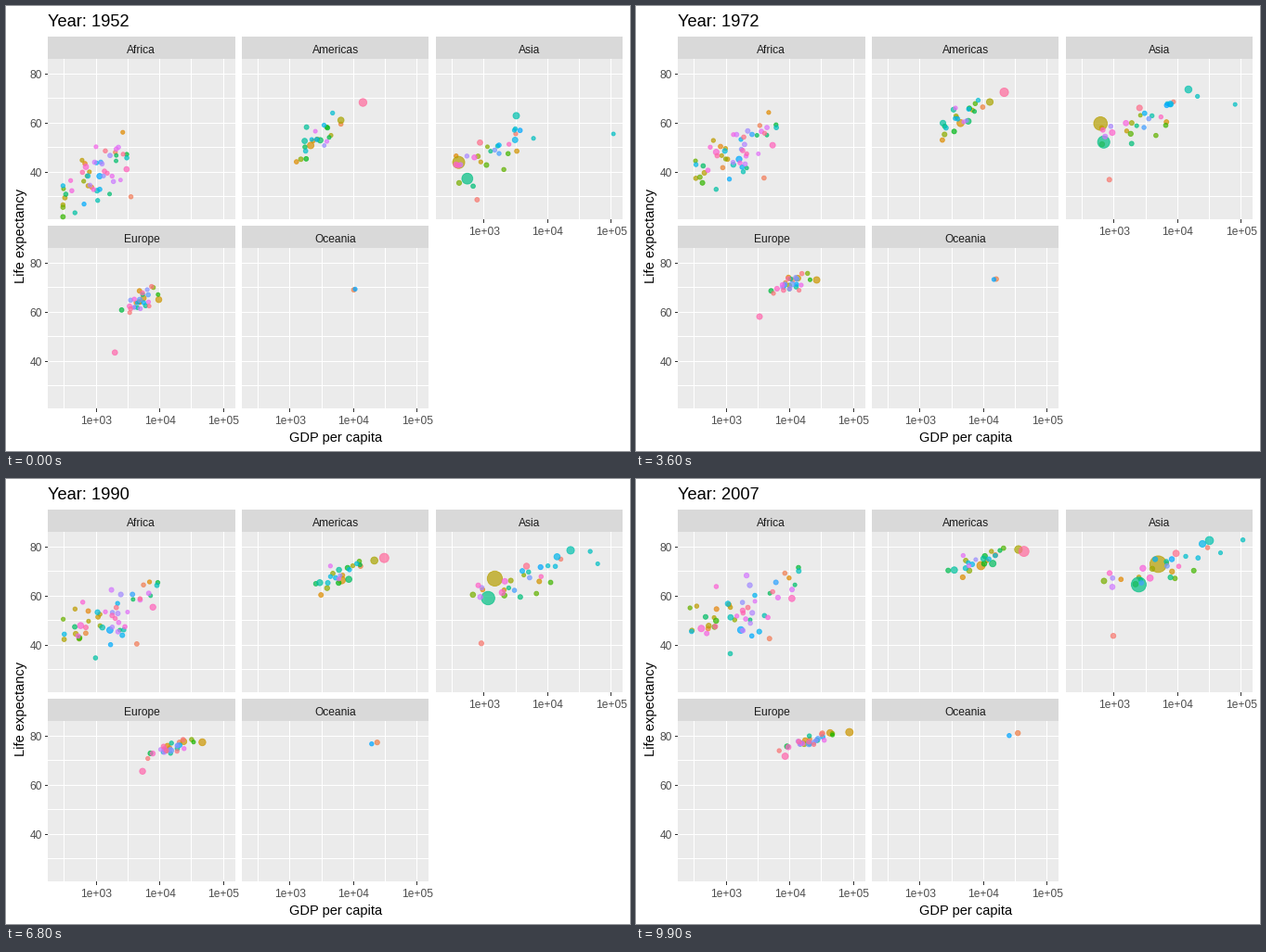
Write a matplotlib script that moves like this. It is 672 px wide and 480 px high and loops after 10000 ms.

```python
import numpy as np
import matplotlib.pyplot as plt
from matplotlib.animation import FuncAnimation
from matplotlib.patches import Rectangle

W, H, DPI = 672, 480, 96
FRAMES, KEYS = 100, 12
PX = 72 / DPI
HUES = 142
plt.rcParams["font.family"] = "Liberation Sans"

# column, row, ease, dots in the cloud, gdp spread, first and last centre
PANELS = {
    "Africa": (0, 0, 0.5, 51, 0.33, (2.98, 39), (3.23, 54.5)),
    "Americas": (1, 0, 0.85, 23, 0.23, (3.45, 53.5), (3.93, 74)),
    "Asia": (2, 0, 0.6, 28, 0.40, (3.17, 48), (3.75, 71.5)),
    "Europe": (0, 1, 0.65, 29, 0.21, (3.72, 65.5), (4.35, 78.5)),
    "Oceania": (1, 1, 1.0, 0, 0, (4, 69), (4.5, 81)),
}

# Dots that stand apart: hue rank, population in millions,
# first and last (gdp, life), and how late gdp grows
STANDOUTS = [
    ("Africa", 4, 7, (3521, 30), (4797, 42.7), 1),
    ("Americas", 15, 115, (2109, 50.9), (9066, 72.4), 0.7),
    ("Americas", 135, 222, (13990, 68.4), (42952, 78.2), 1),
    ("Asia", 1, 14, (779, 28.8), (975, 43.8), 1),
    ("Asia", 25, 880, (400, 44), (4959, 73), 1.75),
    ("Asia", 59, 650, (547, 37.4), (2452, 64.7), 1.85),
    ("Asia", 67, 110, (3217, 63), (31656, 82.6), 0.4),
    ("Asia", 72, 1, (108382, 55.6), (47307, 77.6), 1),
    ("Europe", 132, 43, (1969, 43.6), (8458, 71.8), 1),
    ("Oceania", 6, 14, (10040, 69.1), (34435, 81.2), 1),
    ("Oceania", 92, 3, (10557, 69.4), (25185, 80.2), 1),
]


def panel_left(col):
    return 45.2 + 208.83 * col


def panel_top(row):
    return 57.4 + 204 * row


def x_px(log_gdp, col):
    return panel_left(col) + 51.9 + 68.5 * (log_gdp - 3)


def y_px(life, row):
    return panel_top(row) + 121.9 - 2.65 * (life - 40)


def lerp(a, b, t):
    return a + (b - a) * t


def hcl(hue, chroma=100, lum=65):
    """Polar CIE-Luv colours as clipped sRGB."""
    a = np.radians(hue)
    y = ((lum + 16) / 116) ** 3
    u = chroma * np.cos(a) / (13 * lum) + 0.1978
    v = chroma * np.sin(a) / (13 * lum) + 0.4683
    x = 2.25 * y * u / v
    z = 3 * y / v - x / 3 - 5 * y
    to_rgb = np.array([[3.2405, -1.5371, -0.4985],
                       [-0.9693, 1.8760, 0.0416],
                       [0.0556, -0.2040, 1.0572]])
    lin = np.clip(to_rgb @ np.array([x, np.full_like(x, y), z]), 0, 1)
    rgb = np.where(lin <= 0.0031308, 12.92 * lin,
                   1.055 * lin ** (1 / 2.4) - 0.055)
    return np.clip(rgb, 0, 1).T


def radius(pop):
    return 1.85 + 7.1 * np.sqrt(np.clip(pop / 1318, 0, 1))


def cloud_path(first, last, ease, spread, u, rng):
    """A point drifting with its panel's centre, keeping most of its offset."""
    a, b, c, d = np.clip(rng.normal(size=4), -1.9, 1.9)
    t, hump = u ** ease, 4 * u * (1 - u)
    mean = lerp(first[1], last[1], t)
    dx = spread * (0.8 + 0.4 * u) * lerp(a, 0.8 * a + 0.6 * b, u)
    dy = (0.13 + 0.11 * u) * (84 - mean) * lerp(c, 0.6 * c + 0.8 * d, u)
    x = lerp(first[0], last[0], t) + dx + rng.normal(0, 0.02, KEYS) * hump
    y = mean + lerp(14, 9, t) * dx + dy + rng.normal(0, 0.4, KEYS) * hump
    ceiling = 74 + 9 * u
    return x, ceiling - 1.5 * np.log1p(np.exp((ceiling - y) / 1.5))


def build_dots():
    rng = np.random.default_rng(52)
    u = np.linspace(0, 1, KEYS)
    dots = []

    def add(rank, pop, x, y, panel):
        col, row = PANELS[panel][:2]
        r = radius(pop * np.exp(0.85 * (u - 0.5)))
        dots.append((rank, np.array([x_px(x, col), y_px(y, row), r])))

    for panel, rank, pop, (g0, l0), (g1, l1), late in STANDOUTS:
        x = lerp(np.log10(g0), np.log10(g1), u ** late)
        add(rank, pop, x, lerp(l0, l1, u ** PANELS[panel][2]), panel)

    used = [s[1] for s in STANDOUTS]
    free = iter(rng.permutation(np.setdiff1d(np.arange(1, HUES + 1), used)))
    for panel, (_, _, ease, count, spread, first, last) in PANELS.items():
        for _ in range(count):
            pop = min(6 * np.exp(rng.normal(0, 1.1)), 90)
            add(next(free), pop,
                *cloud_path(first, last, ease, spread, u, rng), panel)

    dots.sort(key=lambda dot: dot[0])
    return np.array([d[0] for d in dots]), np.array([d[1] for d in dots])


fig = plt.figure(figsize=(W / DPI, H / DPI), dpi=DPI, facecolor="white")
ax = fig.add_axes([0, 0, 1, 1])
ax.set(xlim=(0, W), ylim=(H, 0))
ax.axis("off")


def label(x, y, text, size=12, color="#4D4D4D", ha="center", **kw):
    return ax.text(x, y, text, fontsize=size * PX, color=color, ha=ha,
                   va="baseline", **kw)


def box(x0, y0, x1, y1, color):
    x0, y0, x1, y1 = np.round([x0, y0, x1, y1])
    ax.add_patch(Rectangle((x0, y0), x1 - x0, y1 - y0, fc=color, ec="none",
                           snap=False))


def h_line(x0, x1, y, color="white"):
    box(x0, np.floor(y), x1, np.floor(y) + 1, color)


def v_line(x, y0, y1, color="white"):
    box(np.floor(x), y0, np.floor(x) + 1, y1, color)


def draw_panel(name, col, row):
    left, top = panel_left(col), panel_top(row)
    right, bottom = left + 201.4, top + 172.6
    box(left, top - 24.4, right, top, "#D9D9D9")
    box(left, top, right, bottom, "#EBEBEB")
    label((left + right) / 2, top - 6, name, color="#1A1A1A")
    for e in np.arange(2.5, 5.1, 0.5):
        v_line(x_px(e, col), top, bottom)
    for life in range(30, 81, 10):
        h_line(left, right, y_px(life, row))
    if row == 1 or col == 2:
        for e in (3, 4, 5):
            x = x_px(e, col)
            v_line(x, bottom, bottom + 3.7, "#333333")
            label(x, bottom + 16.8, f"1e+0{e}")
    if col == 0:
        for life in (40, 60, 80):
            y = y_px(life, row)
            h_line(left - 3.7, left, y, "#333333")
            label(left - 6.4, y + 4.6, str(life), ha="right")


for name, (col, row, *_) in PANELS.items():
    draw_panel(name, col, row)

label(355, 470, "GDP per capita", 14.67, "black")
label(20.5, 247.5, "Life expectancy", 14.67, "black", rotation=90,
      rotation_mode="anchor")
title = label(45, 22, "", 18.2, "black", ha="left")

ranks, paths = build_dots()
cloud = ax.scatter(paths[:, 0, 0], paths[:, 1, 0],
                   c=hcl(15 + 360 * (ranks - 1) / HUES),
                   alpha=0.7, linewidths=0.9 * PX, zorder=3)


def update(i):
    # Straight moves between five-year keys
    pos = i * (KEYS - 1) / (FRAMES - 1)
    k = min(int(pos), KEYS - 2)
    x, y, r = lerp(paths[:, :, k], paths[:, :, k + 1], pos - k).T
    cloud.set_offsets(np.column_stack([x, y]))
    cloud.set_sizes((2 * r * PX) ** 2)
    title.set_text(f"Year: {round(1952 + 5 * pos)}")
    return cloud, title


anim = FuncAnimation(fig, update, frames=FRAMES, interval=100, repeat=True,
                     repeat_delay=0)
plt.show()
```
